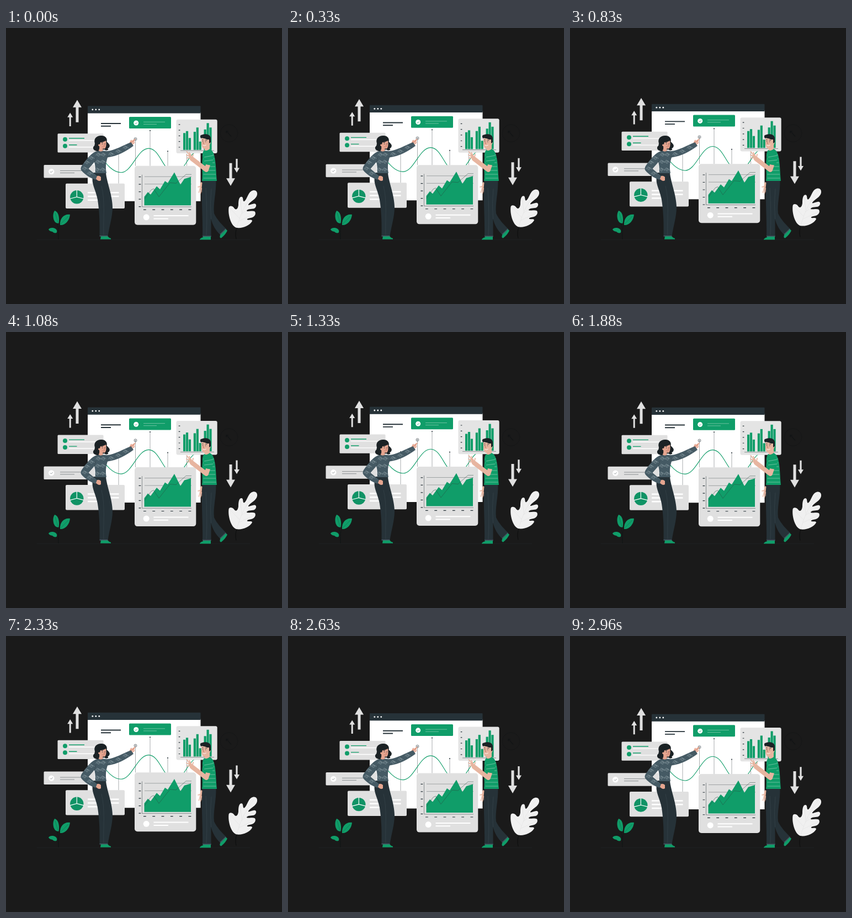
An HTML page for the animation above (3000 ms loop, 500 px wide and 500 px high).

```html
<!DOCTYPE html>
<html lang="en">
<head>
<meta charset="utf-8">
<title>Floating dashboard</title>
<style>
  html, body { margin: 0; width: 100%; height: 100%; overflow: hidden; background: #1a1a1a; }
  svg { display: block; width: 100vw; height: 100vh; }
  path { fill: none; }
  .card { fill: #e0e0e0; }
  .green { fill: #109d69; }
  .dark { fill: #263238; }
  .white { fill: #fff; }
  .skin { fill: #e5a58f; }
  .peach { fill: #e7b5a0; }
  .hair { fill: #1b2225; }
  .knit { fill: #455a64; }
  .foliage { fill: #f0f0f0; }
  .ink { stroke: #263238; }
  .thin { stroke: #4d5659; stroke-width: .6; }
  .seam { stroke: #39474d; stroke-width: .6; }
  .cuff { stroke: #455a64; stroke-width: 1.6; }
  .stripe { stroke: #a4d6c1; stroke-width: .6; }
  .lite { stroke: #fff; }
  .lime { stroke: #109d69; }
  .hand { stroke: #e5a58f; }
  .arm { stroke: #e7b5a0; }
  .lip { stroke: #b96e5d; stroke-width: .7; }
  .hand, .arm, .lip, .round { stroke-linecap: round; stroke-linejoin: round; }
</style>
</head>
<body>
<svg viewBox="0 0 500 500">
  <path d="M56 383.4H442" stroke="#242829" stroke-width=".6"/>
  <g stroke="#131516">
    <circle cx="404" cy="190.700" r="15.800" fill="none" stroke-width=".6"/>
    <path d="M408 196.500L400 187.500M399 190.500V186.700H402.800" stroke-width="1.400"/>
  </g>

  <!-- small plant -->
  <path d="M92 353Q96 366 95 383M98 356Q93 366 95 383" stroke="#121616" stroke-width=".7"/>
  <path class="green" d="M88 331C84 337 85 347 89 351.500Q92 354.500 95.500 353.500C97 346 96 333 88 331Z"/>
  <path class="green" d="M116 338C106 336 97 344 98 357C107 358 115 349 116 338Z"/>
  <path class="green" d="M77 365Q79 361.500 85 362C91 363 94 367 91.500 371Q87 372.500 84 369Q79 368.500 77 365Z"/>
  <path d="M89 335L94 352M113 341L99 355" stroke="#0b6345" stroke-width=".5"/>

  <g id="float">
    <!-- browser window -->
    <path class="white" d="M148 153H352.5V314H148Z"/>
    <path class="dark" d="M148 154.700V142.500Q148 141.500 149 141.500H351.500Q352.500 141.500 352.500 142.500V154.700Z"/>
    <g class="white">
      <circle cx="156.800" cy="148" r="1.4"/><circle cx="162.800" cy="148" r="1.4"/><circle cx="168.800" cy="148" r="1.4"/>
    </g>
    <path class="ink" stroke-width="1.9" d="M172 173.2H208M172 177.9H190"/>
    <path stroke="#92989a" stroke-width=".8" d="M204 223V282M234.500 201V250M261 186V250M293 223.500V250M327.500 228V250"/>
    <path class="lime" stroke-width="1.100" d="M170 230C182 248 194 262 208.500 262C228 262 238 218.300 258.500 218.300C279 218.300 285 262 305 262C322 262 326 238 341 226"/>
    <g class="dark">
      <circle cx="204" cy="223" r="1"/><circle cx="261" cy="186" r="1"/><circle cx="293" cy="223.500" r="1"/>
      <circle cx="234.500" cy="201.300" r="1"/>
    </g>
    <circle class="ink" cx="234.500" cy="201.300" r="2.500" fill="#fff" fill-opacity=".3" stroke-width=".6"/>
    <rect class="green" x="223" y="161.3" width="76" height="21" rx="1.500"/>
    <circle class="white" cx="235.700" cy="172.200" r="4.500"/>
    <path class="lime" stroke-width=".7" d="M233.600 172.300L235.200 174L238 171"/>
    <path stroke="#a9d9c5" stroke-width=".6" d="M249 170.500H288M249 174.600H273"/>

    <!-- left cards -->
    <rect class="card" x="93.500" y="191.500" width="83" height="34.300" rx="1.500"/>
    <circle class="green" cx="107" cy="202" r="4"/><circle class="green" cx="107" cy="214" r="4"/>
    <path class="lime" stroke-width="1.400" d="M114 200H142M114 212H128.500"/>
    <path class="lite" stroke-width="1.400" d="M114 203.900H165M114 215.900H165"/>
    <rect class="card" x="68.500" y="248.300" width="92" height="23.500" rx="1.500"/>
    <circle class="white" cx="82.300" cy="260.300" r="5.200"/>
    <path class="thin" d="M80 260.300L81.700 262L84.700 259M98 258.700H138M98 262.700H124"/>
    <rect class="card" x="108" y="282" width="107" height="45.300" rx="2"/>
    <circle fill="#109365" cx="128.300" cy="306.500" r="12.200"/>
    <path class="lite" stroke-width="1.200" d="M128.300 294V306.300L116 309.500M128.300 306.300L141 309.500"/>
    <path class="lite" stroke-width="2.500" d="M148 298.500H204.500M148 305.200H204.500M148 312H167"/>

    <!-- bar chart -->
    <rect fill="#e4e4e4" x="308.500" y="166" width="74.200" height="61.300" rx="3"/>
    <g id="bars" class="green"></g>
    <path class="thin" d="M316 222.300H377"/>

    <!-- area chart -->
    <rect class="card" x="233" y="250" width="111.300" height="107" rx="5"/>
    <path class="thin" d="M246.500 266V324.200H336"/>
    <path class="thin" stroke-opacity=".75" d="M251 269.500H336M251 283H336"/>
    <path class="green" d="M250.500 321.500V306L257 297.500L262 302L273 287L279 292.500L288 277.500L293 281L305 261.800L316 284L323 273.500L335 270V321.500Z"/>
    <path stroke="#29483f" stroke-width=".5" d="M251 310L263 293.500L267.500 291.500L277 306L297 280.500L308 281.500L326 265.500H336"/>
    <path id="ticks" class="ink" stroke-width="1.200"/>
    <circle class="white" cx="254.200" cy="343" r="5.500"/>
    <path class="lite" stroke-width="2" d="M267.500 340.300H330.500M267.500 345.600H294"/>

    <!-- arrows -->
    <g class="card">
      <polygon points="129,130.500 137,144 131.500,144 131.500,171 126.500,171 126.500,144 121,144"/>
      <polygon points="116.200,153.800 121.200,162 117.700,162 117.700,178.300 114.700,178.300 114.700,162 111.200,162"/>
      <polygon points="407,286.300 399,272.500 404.500,272.500 404.500,245 409.500,245 409.500,272.500 415,272.500"/>
      <polygon points="418,262.200 413,253.800 416.400,253.800 416.400,237.300 419.600,237.300 419.600,253.800 423,253.800"/>
    </g>

    <!-- large leaf -->
    <path stroke="#0b0d0d" stroke-width=".9" d="M419 360Q414 371 417 382.500"/>
    <path class="foliage" d="M417 362C407 358 402 338 403.500 326C404 321.500 410 322 413 326C416 331 420 329 421 321C421 313 422 306 426.500 306C431 306 428 316 432 314C437 310 438 300 444 296C450 292 456 295 455 302C454 310 443 314 439 320C438 323 446 318 451 318.500C455 320 453 326 449 327.500C444 328.500 437 328 436 331C436 334 446 330 451 333C454 338 449 344 442 344.500C439 345 436 346 437 347.500C439 349 446 346 446 350C441 359 427 364 417 362Z"/>
    <path stroke="#dedede" stroke-width=".5" d="M418 361Q428 325 449 299M423 345L407 328M427 334L425 310M426 337L449 322M422 350L449 337"/>
  </g>

  <!-- woman -->
  <g>
    <path class="green" d="M172 377H184Q186 380 190 381V382.700H171Z"/>
    <path class="dark" d="M158.500 262H181C182 278 193 303 193 325C193 341 188 356 184.500 377H169.500C170 352 169 331 166 311C163 295 156 285 156.500 273Z"/>
    <path class="cuff" d="M169.500 376.800H184.300"/>
    <path class="seam" d="M173 286C180 315 176 345 177 375"/>
    <path class="hand" stroke-width="4" d="M225 209L231 204.500"/>
    <path class="hand" stroke-width="1.700" d="M230 204.500L233.800 201.500M229 210.500L232.500 207.500M225 207L227 203.500"/>
    <path class="skin" d="M163 269Q168 266 172 270V276Q169 278 166 276L162 273Z"/>
    <path class="knit" d="M162 224C168 221.500 176 222 183 223C198 221.500 211 213 226.500 207L231 213.500C217 224 202 232 184 234.500C181 244 180 252 182 263H161.500C162 253 161.500 248 160 243L149.500 255L165 268L162.500 275C153 272 143 266 136.500 258C134.500 255 136 251.500 138 248.500C145 239 152 229 162 224Z"/>
    <path id="swirls" stroke="#9fb0b6" stroke-width=".6"/>
    <path class="seam" d="M160 243L163 233M184 234.500L181 229"/>
    <path class="hair" d="M161 209C158 200 165 194.500 173 195C181 195 184 201 182.500 206C185 209 189 211 187.500 215C187 217 185 218 184 218.500C188 220 182 224 178 220L168 223C161 224 156 219 158.500 215Q161 213 161 209Z"/>
    <path class="skin" d="M171 207C175 207 179 205 181 204C182 209 182 216 179 218.500Q177 219 175.500 218V222.500Q171 225 167.500 222Q170 219 169 214C166 214 167 209 170 211Z"/>
    <path class="hair" d="M170 211Q169 206 174 205.500Q179 205 181 202.500L176 199L167 203Z"/>
    <path class="ink round" stroke-width=".8" d="M174.500 209.700V210.500M179.300 209.300V210.100M173 207.700L175.500 207.300"/>
    <path class="lip" d="M177.500 210L178.600 213H177M174.500 215Q177 217 179 214.600"/>
  </g>

  <!-- man -->
  <g>
    <path class="green" d="M357 378H371V383.500H351Q351 381 357 379ZM388 375L396.500 363L401 367Q398 374 390 380.500Q386 380.500 388 375Z"/>
    <path class="arm" stroke-width="3.500" d="M354 281L352.500 291"/>
    <path class="arm" stroke-width="1.500" d="M352 287L348 288M352 290L349.500 298M353.500 291L352.500 299.500M355 290V297"/>
    <path class="dark" d="M356 276H380.500C381 298 375 318 377 336C382 347 391 356 399 364L388 374.500C380 367 374 357 371.500 346V378H356C357 345 353 306 356 276Z"/>
    <path class="cuff" d="M356 377.300H371.700M388 374L398.300 364"/>
    <path class="seam" d="M371.500 346Q369 319 372 291M362 290Q365 336 363 375"/>
    <path class="peach" d="M357 204C361 206 365 207 368 204L371 207L369 212V221Q365 226 360 222V219C355 219 354 211 354 205Z"/>
    <path class="green" d="M359 221Q364 224 369 219Q375 222 377 230C381 245 380 261 382 277H355C357 263 354 249 356 235Q355 226 359 221Z"/>
    <path id="stripes" class="stripe"/>
    <path class="arm" stroke-width="8" d="M366 248L363 257L337 237"/>
    <path class="arm" stroke-width="5" d="M338 238L333 231"/>
    <path class="arm" stroke-width="1.800" d="M333 231L327.500 224M333 233L327 230M335 235L328.500 235.500M335 231L332 225.500M338 234L339 229"/>
    <path class="green" d="M358 229C365 223 375 224 376 236L373 249Q365 248 358 246Z"/>
    <path class="stripe" d="M359 234L375 231M359 241L375 239"/>
    <path class="hair" d="M353 200Q350 194 355 193.500C362 190.500 370 193 371 199V207L368 209V202C363 204 359 198 353 200Z"/>
    <path class="peach" d="M354 200Q359 199 364 202H368V213Q365 219 359 217.500Q354 216.500 354 208Z"/>
    <path class="ink round" stroke-width=".8" d="M356.500 205.300V206.200M361.800 205.600V206.500M355.500 202.800H357.500M361 203L364 203.500"/>
    <path class="lip" d="M358.500 206L357 209.700H359"/>
    <path class="lite round" stroke-width=".9" d="M357 212.500Q360 214.500 362.500 212"/>
  </g>
</svg>
<script>
  const byId = id => document.getElementById(id);
  const range = n => [...Array(n).keys()];

  // Nine bars in three groups
  const tops = [190.5, 187, 199.5, 188.3, 180.5, 206, 184, 172.5, 180.5];
  byId('bars').innerHTML = tops.map((y, i) => {
    const x = 321 + Math.floor(i / 3) * 18.8 + i % 3 * 4.9;
    return `<rect x="${x}" y="${y}" width="4.2" height="${221 - y}"/>`;
  }).join('');

  byId('ticks').setAttribute('d',
    range(5).map(i => `M240.5 ${269.8 + i * 13.5}h3.8`).join('') +
    range(6).map(i => `M${249 + i * 16.3} 329.4h4.8`).join('') +
    range(5).map(i => `M312.8 ${175 + i * 10.3}h2.6`).join(''));

  const curls = [[146, 243], [142, 254], [151, 263], [154, 235], [167, 229], [176, 229],
    [166, 242], [175, 242], [165, 256], [175, 256], [190, 228], [203, 223], [216, 216]];
  byId('swirls').setAttribute('d', curls.map(([x, y]) =>
    `M${x - 4} ${y + 2}q3 -7 6 -3q2 4 -2 4q-3 -2 1 -4q4 0 5 3`).join(''));

  byId('stripes').setAttribute('d', range(7).map(i =>
    `M357.5 ${230 + i * 7}H${377 + i * .6}`).join(''));

  // Steady rise and fall, slightly ahead of the loop start
  const group = byId('float');
  const LOOP = 3000, LEAD = 50, RISE = 6.5;
  function draw() {
    const phase = (performance.now() + LEAD) % LOOP / LOOP;
    const y = RISE * (Math.abs(2 * phase - 1) - 1);
    group.setAttribute('transform', `translate(0 ${y.toFixed(3)})`);
    requestAnimationFrame(draw);
  }
  draw();
</script>
</body>
</html>
```
